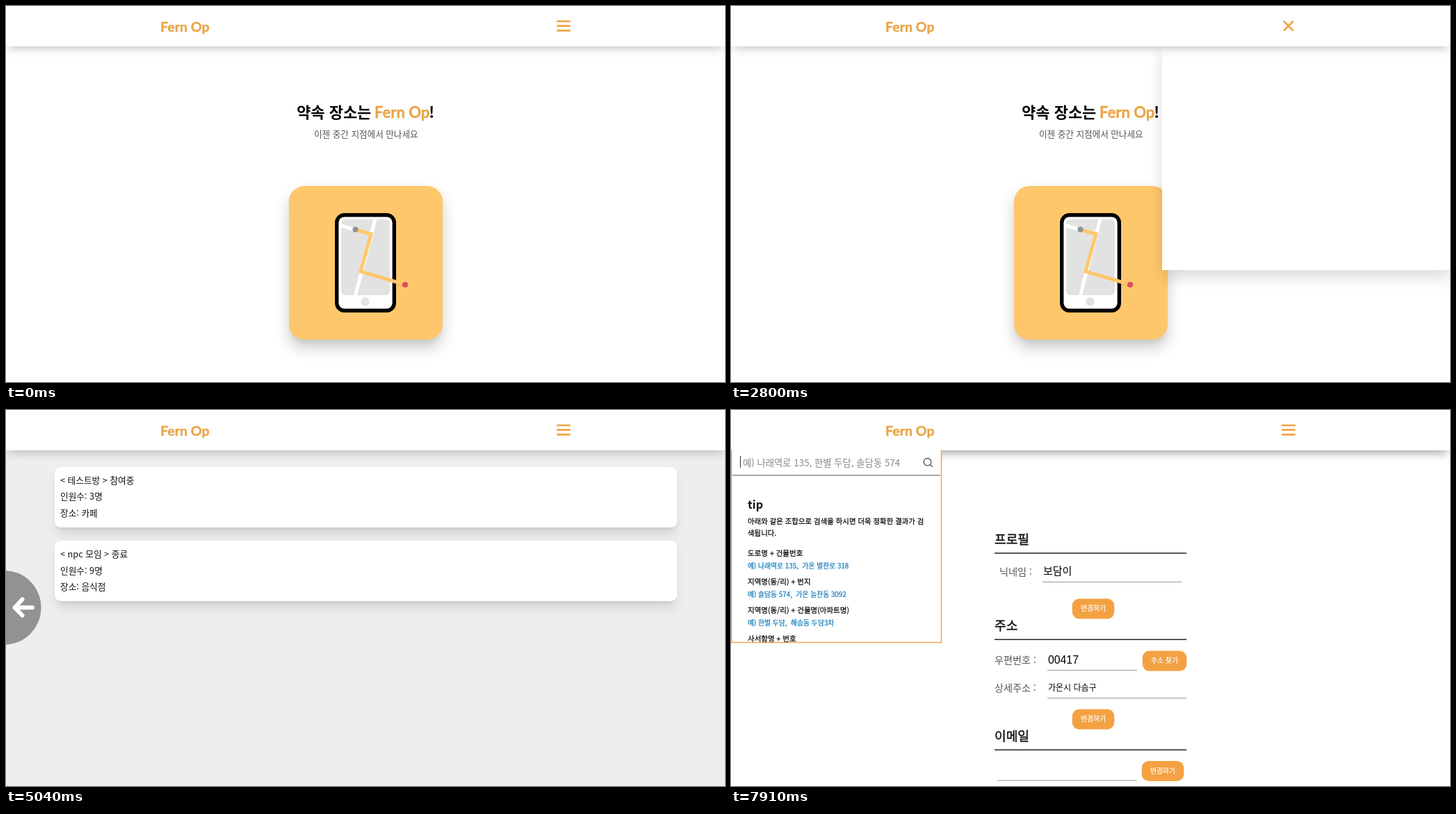
Animation of 1034x541 px, one loop 8 s. Source, as an HTML page:

```html
<!DOCTYPE html>
<html lang="ko">
<head>
<meta charset="utf-8">
<title>Fern Op</title>
<style>
html, body { margin: 0; width: 100%; height: 100%; overflow: hidden; background: #fff; }
#stage { position: relative; width: 1034px; height: 541px; overflow: hidden; background: #fff; }
.layer, .layer > svg { position: absolute; left: 0; top: 0; width: 1034px; height: 541px; }
.box { position: absolute; box-sizing: border-box; background: #fff; }
text { font-family: "Noto Sans CJK KR", "Noto Sans CJK", sans-serif; white-space: pre; }
text.brand { font-family: Lato, sans-serif; font-weight: 700; stroke: #eba546; stroke-width: .4; stroke-linejoin: round; }
text.digits { font-family: "Liberation Sans", Arial, sans-serif; }
text.medium { stroke: currentColor; stroke-width: .024em; }
#header { height: 57.5px; background: #fff; box-shadow: 0 7px 12px -3px rgba(0,0,0,.2); }
#header.deep { box-shadow: 0 8px 12px -4px rgba(0,0,0,.35); }
#history { background: #eee; }
.tile { border-radius: 22px; background: #ffc76b;
  box-shadow: 0 12px 20px 2px rgba(0,0,0,.16), 0 8px 8px -4px rgba(0,0,0,.09); }
.room { border-radius: 9px;
  box-shadow: 0 12px 16px -2px rgba(0,0,0,.1), 0 6px 6px -5px rgba(0,0,0,.1); }
#menu { box-shadow: 0 10px 20px rgba(0,0,0,.15); }
</style>
</head>
<body>
<div id="stage"></div>
<script>
const ORANGE = '#f0a343', LOOP = 8000, TICK = 70;

const text = (x, y, size, str, fill = '#111', weight = 400, cls = '') =>
  `<text class="${cls}" x="${x}" y="${y}" font-size="${size}" fill="${fill}" color="${fill}" font-weight="${weight}">${
    str.replace(/</g, '&lt;').replace(/>/g, '&gt;')}</text>`;
const medium = (x, y, size, str, fill) => text(x, y, size, str, fill, 400, 'medium');
const brand = (x, y, size) => text(x, y, size, 'Fern Op', '#eba546', 700, 'brand');
const line = (x1, x2, y, color, width = 1) =>
  `<path d="M${x1} ${y}H${x2}" stroke="${color}" stroke-width="${width}"/>`;
const stroke = (d, color, width, extra = '') =>
  `<path d="${d}" fill="none" stroke="${color}" stroke-width="${width}" ${extra}/>`;
const rect = (x, y, w, h, r, fill, extra = '') =>
  `<rect x="${x}" y="${y}" width="${w}" height="${h}" rx="${r}" fill="${fill}" ${extra}/>`;
const dot = (x, y, r, fill) => `<circle cx="${x}" cy="${y}" r="${r}" fill="${fill}"/>`;
const icon = (x, y, scale, body) => `<g transform="translate(${x} ${y}) scale(${scale})">${body}</g>`;
const box = (x, y, w, h, cls = '', id = '') =>
  `<div class="box ${cls}" id="${id}" style="left:${x}px;top:${y}px;width:${w}px;height:${h}px"></div>`;
const layer = (id, boxes, drawing) =>
  `<div class="layer" id="${id}">${boxes}<svg viewBox="0 0 1034 541">${drawing}</svg></div>`;
const ROUND = 'stroke-linecap="round" stroke-linejoin="round"';

function phone() {
  const route = 'M503 322L525 328L510 382L573 400.500';
  return `<clipPath id="screen">${rect(482, 307, 70, 109, 6, '#000')}</clipPath>` +
    rect(475.700, 300.700, 82.600, 137.600, 11, '#fff', 'stroke="#000" stroke-width="5.400"') +
    rect(482, 307, 70, 109, 6, '#e2e2e2') +
    `<g clip-path="url(#screen)">${stroke('M478 315L503 322M532 303L502 418', '#fff', 5)}</g>` +
    dot(516.5, 425.5, 6.2, '#e2e2e2') +
    stroke('M561 400.500L571 403', '#dfac5e', 1) +
    stroke(route, '#ffc76b', 5) + dot(502.5, 321.5, 4.1, '#929292') + dot(574, 401, 4.1, '#e04b63');
}

const home = layer('home', box(406.5, 259, 221.5, 221, 'tile'),
  text(418, 161, 22, '약속 장소는', '#000', 700) + brand(530, 161, 22) + text(608, 161, 22, '!', '#000', 700) +
  text(443, 189, 12.6, '이젠 중간 지점에서 만나세요', '#555') + phone());

const hand = icon(570, 194, 1,
  stroke('M3 4.500L9 10M5.500 2.500L11 9M8.500 2L12 8M2.500 7.500L7 11.500M13 4.500L12.500 9', '#fcc02f', 2.3, ROUND) +
  dot(9.3, 9.6, 4.2, '#fcc02f') + stroke('M1 10Q1.500 12.500 4 13.500M11 1Q13 1.500 14 3', '#9aa5ad', .8));

const icons = [
  icon(458, 249.8, .81, [6, 12, 18].map(y => dot(4, y, 1.5, ORANGE) + line(7, 21, y, ORANGE, 2)).join('')),
  icon(456, 298, .8, stroke('M4 20V17L14.500 6.500L17.500 9.500L7 20Z', ORANGE, 2) +
    stroke('M17 4.500L19.700 7.200', ORANGE, 3.2)),
  icon(454.4, 345.4, .8, `<path d="M4 2H20Q22 2 22 4V16Q22 18 20 18H6L2 22V4Q2 2 4 2Z" fill="${ORANGE}"/>` +
    line(6, 18, 7, '#fff', 2) + line(6, 18, 10, '#fff', 2) + line(6, 14, 13, '#fff', 2)),
  icon(458.2, 393.2, .65, dot(12, 12, 10, ORANGE) +
    stroke('M9 9.500Q9 6.500 12 6.500Q15 6.500 15 9.200Q15 10.500 13 12Q12 13 12 14.500M12 16.500V18.500', '#fff', 2))
];
const entries = [
  [486, 269.5, 281.5, '나의 히스토리'], [484, 317.5, 329.3, '나의 정보 수정'],
  [482, 365, 377.2, '1대1 문의 하기'], [482, 409.5, 421.5, '자주 묻는 질문']
];
const mypage = layer('mypage', '', text(450, 207, 14.1, '보담이님 환영합니다') + hand + icons.join('') +
  entries.map(([x, y, rule, label]) => text(x, y, 15.5, label) + line(310, 724, rule, '#d3c8a5', 1.2)).join(''));

const rooms = [
  [81.5, '< 테스트방 > 참여중', '인원수: 3명', '장소: 카페'],
  [188, '< npc 모임 > 종료', '인원수: 9명', '장소: 음식점']
];
const history = layer('history', rooms.map(([y]) => box(69.5, y, 895, 87, 'room')).join(''),
  rooms.map(([y, ...rows]) => rows.map((row, i) => text(78, y + 24 + i * 23.6, 12.7, row)).join('')).join(''));

const button = (x, y, w, label) =>
  rect(x - .3, y - .2, w + .6, 29, 10, '#f4a142') + medium(x + 12, y + 17.3, 9.8, label, '#fff');
const section = (y, label) => medium(379, y, 18.1, label, '#111') + line(379, 655, y + 13, '#222', 1.4);
const field = (x1, x2, y) => line(x1, x2, y, '#999', 1.2);
const edit = layer('edit', '',
  section(193, '프로필') + text(386, 237.5, 14.1, '닉네임 :', '#555') + text(449, 237, 15, '보담이', '#000') +
  field(448, 648, 247.5) + button(491, 271.7, 60, '변경하기') +
  section(317.3, '주소') + text(379, 364.5, 14.1, '우편번호 :', '#555') +
  text(456, 364.5, 15.8, '00417', '#000', 400, 'digits') + field(455, 584, 374.5) +
  button(592, 346.8, 63, '주소 찾기') + text(379, 405, 14.1, '상세주소 :', '#555') +
  text(456, 404, 12, '가온시 다솜구', '#000') + field(455, 655, 414.5) + button(491, 430.7, 60, '변경하기') +
  section(476, '이메일') + field(383, 583.5, 533) + button(591, 505.2, 60, '변경하기'));

const tips = [
  ['도로명 + 건물번호', '예) 나래역로 135,  가온 별찬로 318'],
  ['지역명(동/리) + 번지', '예) 솔담동 574,  가온 늘찬동 3092'],
  ['지역명(동/리) + 건물명(아파트명)', '예) 한별 두담,  해솜동 두담3차'],
  ['사서함명 + 번호', '']
];
const popup = layer('popup', box(0, 57.5, 303, 277), `<g id="search">` +
  text(17, 80.5, 13.35, '예) 나래역로 135, 한별 두담, 솔담동 574', '#888') +
  `<circle cx="282.500" cy="74.800" r="5.300" fill="none" stroke="#555" stroke-width="1.300"/>` +
  stroke('M286.300 78.600L290 82', '#555', 1.4) + line(2, 301, 94, '#888', 1.6) +
  text(24, 142, 16.2, 'tip', '#111', 700) +
  medium(24, 163.5, 10.43, '아래와 같은 조합으로 검색을 하시면 더욱 정확한 결과가 검') + medium(24, 181, 10.43, '색됩니다.') +
  tips.map(([label, sample], i) => medium(24, 209.5 + i * 41, 10.5, label) +
    medium(24, 228 + i * 41, 9.8, sample, '#0b79b8')).join('') + `</g>` +
  stroke('M.700 57.500V334.400H302.500V57.500', '#eda850', 1.5) +
  `<path id="caret" d="M13.500 66V83" stroke="#333" stroke-width="1"/>`);

const bars = [22, 28.7, 35.4].map(y => `<g class="bar">${rect(791.8, y - 1.35, 20, 2.7, 1.2, ORANGE)}</g>`).join('');
const header = layer('top', box(0, 0, 1034, 57.5, '', 'header'), brand(222, 36.7, 19.6) + bars);
const back = layer('back', '', dot(-3, 284.3, 53.5, '#929292') +
  stroke('M38 284.300H13M23.500 272.500L12.500 284.300L23.500 295.500', '#fff', 6, ROUND));

const stage = document.getElementById('stage');
stage.innerHTML = home + mypage + history + edit + box(620, 57, 414, 323, '', 'menu') + header + popup + back;

const $ = id => document.getElementById(id);
const show = (el, on) => { el.style.display = on ? '' : 'none'; };
const barEls = [...document.querySelectorAll('.bar')];
const pages = ['home', 'mypage', 'history', 'edit'];
const visits = [[0, 'home'], [3500, 'mypage'], [4480, 'history'], [5110, 'mypage'], [5880, 'edit']];
const clamp = v => Math.max(0, Math.min(1, v));
const ease = v => v * v * (3 - 2 * v);

function render(time) {
  const t = Math.floor(time % LOOP / TICK) * TICK;
  const page = visits.filter(([start]) => t >= start).pop()[1];
  pages.forEach(id => show($(id), id === page));
  $('header').classList.toggle('deep', page === 'mypage' || page === 'edit');

  const open = t >= 2450 && t < 3500 ? ease(clamp((t - 2420) / 380)) : 0;
  show($('menu'), open > 0);
  $('menu').style.transform = `translateX(${(1 - open) * 440}px)`;
  barEls.forEach((bar, i) => {
    const side = 1 - i;
    bar.setAttribute('transform',
      `translate(0 ${side * 6.7 * open}) rotate(${side * 45 * open} 801.8 ${28.7 - side * 6.7})`);
    bar.setAttribute('opacity', side ? 1 : 1 - open);
  });

  show($('back'), t >= 5040 && t < 5390);
  $('back').style.opacity = 1 - clamp((t - 5110) / 280);
  show($('popup'), t >= 7350);
  show($('search'), t >= 7630);
  show($('caret'), t >= 7910);
}

function loop() {
  render(performance.now());
  requestAnimationFrame(loop);
}
loop();
</script>
</body>
</html>
```
